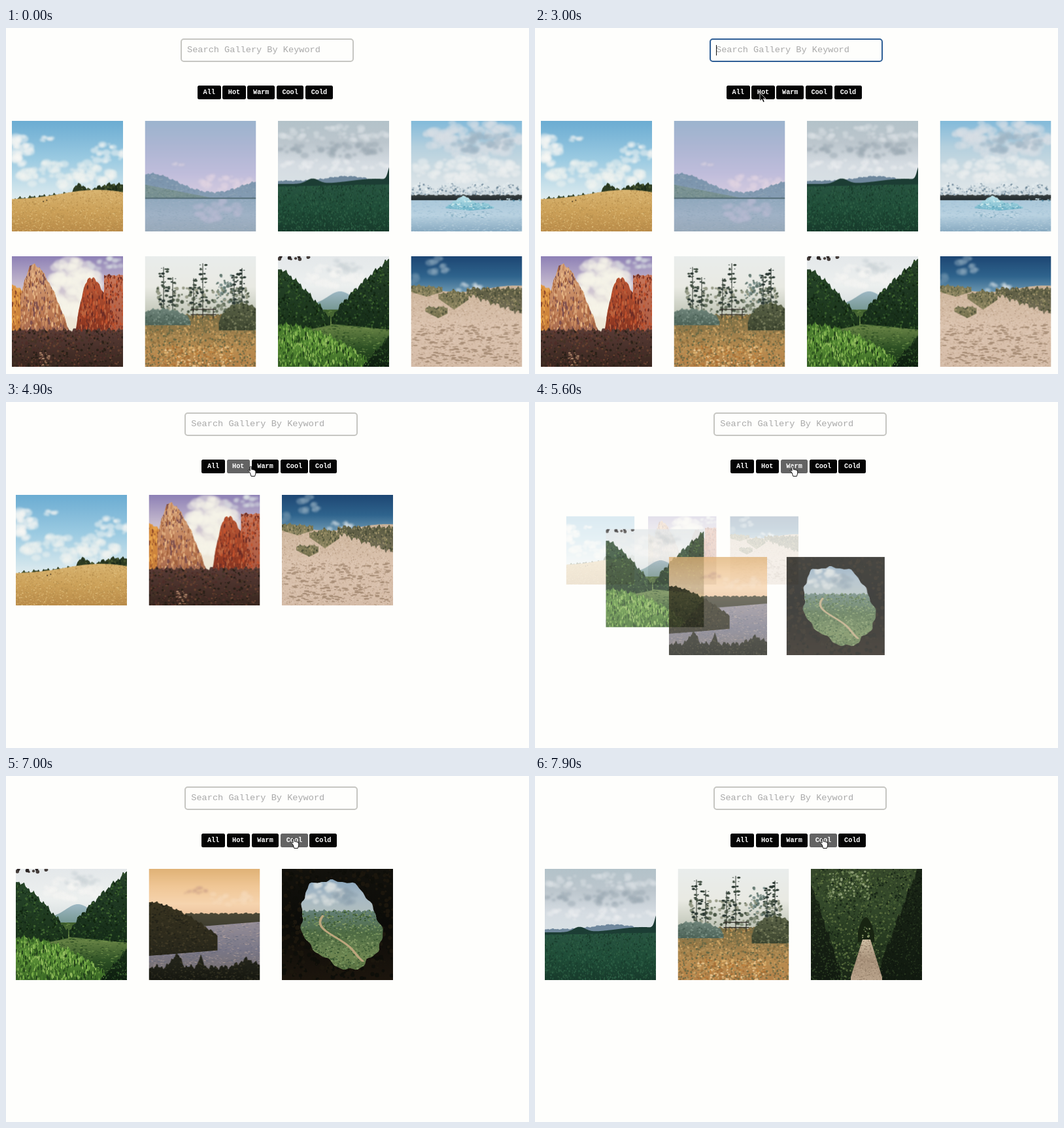
Recreate the animation shown at these times as an HTML page with a canvas. Size 800 px wide and 529 px high, loop 8 s.

```html
<!DOCTYPE html>
<html lang="en">
<head>
<meta charset="utf-8">
<title>Filterable gallery</title>
<style>
html, body { margin: 0; width: 100%; height: 100%; overflow: hidden; background: #fefefc; }
#page { position: absolute; inset: 0; font-family: "Liberation Mono", monospace; }
#search { position: absolute; left: 267px; top: 16px; width: 265px; height: 36px; box-sizing: border-box;
  border: 2px solid #c6c6c2; border-radius: 5px; padding-left: 8px;
  font-size: 13.6px; line-height: 32px; color: #a9a9a9; white-space: pre; }
#search.focus { border-color: #2f5f96; }
#caret { position: absolute; left: 8px; top: 8px; width: 1px; height: 16px; background: #111; }
#bar { position: absolute; left: 293px; top: 88px; display: flex; gap: 2.7px; }
#bar span { padding: 0 8.6px; height: 20.5px; border-radius: 2.5px; background: #040404; color: #fff;
  font-weight: bold; font-size: 10.2px; line-height: 21px; }
#bar span.hover { background: #636363; }
#grid canvas { position: absolute; left: 9.2px; top: 141.5px; width: 169.7px; height: 169.7px; }
#cursor { position: absolute; left: 0; top: 0; overflow: visible; }
</style>
</head>
<body>
<div id="page">
  <div id="search">Search Gallery By Keyword<i id="caret"></i></div>
  <div id="bar"><span>All</span><span>Hot</span><span>Warm</span><span>Cool</span><span>Cold</span></div>
  <div id="grid"></div>
</div>
<svg id="cursor" width="20" height="20">
  <path id="arrow" d="M0 0V12.5L3 9.9 5.1 14.6 7.2 13.7 5.2 9.2H9Z" fill="#000" stroke="#fff" stroke-width=".8"/>
  <path id="beam" d="M-2-7Q0-7 0-5V5Q0 7-2 7M2-7Q0-7 0-5V5Q0 7 2 7" fill="none" stroke="#222"/>
  <path id="hand" d="M3 9L.6 6.6Q-.4 5 1.3 5L3 6.4V1Q3-.6 4.2-.6T5.4 1V4.2Q7.2 3.5 7.8 4.8 9.4 4.2 9.9 5.5 11.7 5.2 11.7 7V10L10.4 14.5H4.8Z" fill="#fff" stroke="#000" stroke-width=".9"/>
</svg>
<script>
const $ = id => document.getElementById(id);
const { abs, sin, cos, exp, min, max, PI } = Math;
const SIZE = 170, LOOP = 8000;
let seed = 7, g;
const rnd = () => (seed = (seed * 16807) % 2147483647) / 2147483647;
const hill = (x, center, width, height) => height * exp(-(((x - center) / width) ** 2));
const rough = (x, size) => size * (sin(x * .37) + sin(x * .83 + 1) + sin(x * 1.7 + 2) / 2);

function dot(x, y, rx, ry) {
  g.beginPath();
  g.ellipse(x, y, rx, ry, 0, 0, 7);
  g.fill();
}
// Random specks in a box; tall > 1 gives blades, tall < 1 gives ripples.
function spray(colors, x, y, w, h, r = 1, tall = 1) {
  const list = colors.split(" ");
  for (let n = w * h / (r * r * 7 * tall ** .5); n > 0; n--) {
    const k = r * (.4 + rnd());
    g.fillStyle = list[Math.floor(rnd() * list.length)];
    dot(x + rnd() * w, y + rnd() * h, k, k * tall);
  }
}
function cloud(color, x, y, w, h) {
  g.save();
  g.filter = "blur(1.5px)";
  g.globalAlpha = .5;
  g.fillStyle = color;
  for (let n = 8 + w * h / 90; n > 0; n--) {
    const a = rnd() * 7, d = rnd() ** .5 / 2, k = (2 + h / 9) * (.4 + rnd());
    dot(x + w / 2 + cos(a) * d * w, y + h / 2 + sin(a) * d * h, k, k * .7);
  }
  g.restore();
}
// Ground below a skyline top(x), with a vertical blend and optional specks.
function land(colors, top, { bottom = () => SIZE, from = 0, to = SIZE, specks, r, tall } = {}) {
  const xs = Array.from({ length: to - from + 1 }, (_, i) => from + i);
  const y0 = min(...xs.map(top)), y1 = max(...xs.map(bottom));
  const blend = g.createLinearGradient(0, y0, 0, y1), list = colors.split(" ");
  list.forEach((c, i) => blend.addColorStop(i / max(1, list.length - 1), c));
  g.save();
  g.beginPath();
  xs.forEach(x => g.lineTo(x, top(x)));
  xs.reverse().forEach(x => g.lineTo(x, bottom(x)));
  g.fillStyle = blend;
  g.fill();
  if (specks) {
    g.clip();
    spray(specks, from, y0, to - from, y1 - y0, r, tall);
  }
  g.restore();
}
const sky = (colors, y = 120) => land(colors, () => 0, { bottom: () => y });

const scenes = [
  function wheat() {
    sky("#6bacd2 #9ccbe2 #dfecef");
    cloud("#fbfaf5", 0, 20, 30, 48);
    cloud("#fbfaf5", 40, 22, 22, 10);
    cloud("#fbfaf5", 118, 35, 56, 28);
    cloud("#f4f5f2", 8, 62, 150, 42);
    land("#28371f #47512f", x => 120 - x * .1 - hill(x, 103, 9, 13) - hill(x, 150, 28, 8) + rough(x, 1.3),
      { specks: "#1c2b1b #46552f", r: 1.5 });
    land("#d9b571 #cca159 #b98b49", x => 121 - hill(x, 130, 75, 15),
      { specks: "#b18a4a #dfbe7c #c39a56 #d0a762", tall: .5 });
    spray("#4a3a24", 48, 122, 10, 4, 1.6, .7);
  },
  function lake() {
    sky("#9cb4ce #adb6d3 #bfbddb #d9cee1");
    cloud("#e6d8e3", 85, 82, 85, 26);
    cloud("#e4dae4", 42, 65, 18, 4);
    land("#7993ac #94a9bc", x => 113 - hill(x, 8, 58, 32) - hill(x, 178, 45, 20) + rough(x, .8),
      { specks: "#8299ad #8ea3b6 #7a91a9", r: 1.5, tall: .6 });
    land("#7d9597 #657f80", x => 98 + x * .2, { to: 100, specks: "#869c98 #6b8583", r: 1.2, tall: .5 });
    land("#8fa8bd #a0b2c6 #98a9b9", () => 119, { specks: "#a6b5c9 #8ca3b7 #9aacc0", r: 1.4, tall: .2 });
    cloud("#b9bcd3", 75, 122, 75, 34);
    land("#566e78", () => 118, { bottom: () => 120 });
  },
  function meadow() {
    sky("#b3c2c9 #bcc6cd #d5dce2 #d9e1e5", 100);
    cloud("#9aa8b2", 0, 32, 170, 24);
    cloud("#dce2e5", 0, 8, 170, 24);
    cloud("#edf0f1", 0, 60, 170, 18);
    land("#6e879d #74898f", x => 92 - hill(x, 105, 40, 7) + rough(x, .5));
    land("#1b3933 #1f4a38", x => 97 - hill(x, 53, 13, 8) - hill(x, 150, 55, 8) - hill(x, 172, 5, 22));
    land("#285341 #1f4d38 #173a2b", x => 101 - x * .02,
      { specks: "#275840 #193d2d #204b35 #2d5d43", r: .9, tall: 1.5 });
  },
  function glacier() {
    sky("#82bada #b5d0de #d1dee4 #e5eaec");
    cloud("#d9e0e5", 20, 0, 150, 55);
    cloud("#9eb4c3", 60, 15, 100, 35);
    cloud("#eff2f2", 0, 55, 170, 40);
    land("#e4ecef #8096a4", x => 106 - 10 * abs(sin(x / 14 + .5)) + rough(x, 1),
      { specks: "#e8eff1 #70899a #a9bac5", r: 1.2 });
    land("#a9c7da #bad3e2 #87a9c0", () => 120, { specks: "#b7cfdc #9dbdd1", r: 1.5, tall: .25 });
    land("#3b4141 #222b2f", x => 114 + rough(x, .5), { bottom: () => 122 });
    land("#c4e8ee #6cb1c7", x => 134 - hill(x, 80, 19, 18) - hill(x, 113, 12, 7) + rough(x, .6),
      { from: 53, to: 127, bottom: x => 138 - abs(x - 90) * .1, specks: "#def2f3 #589db5 #9bd0dd", r: 1.2, tall: .7 });
    spray("#d2e6ed #498099", 128, 119, 42, 4, 1.3, .6);
    spray("#5e91a9 #d2e3eb", 55, 140, 65, 9, 1.5, .25);
  },
  function canyon() {
    sky("#8d80b5 #c3b8cd #efe8dc #efe8d2", 125);
    cloud("#f8f5ea", 55, 5, 75, 85);
    cloud("#dbe2e3", 115, 0, 55, 22);
    const red = "#c3532e #6d2d25 #963c24 #bc6540";
    land("#e29a45 #a85c2c", x => 42 + x * .7 + rough(x, 1),
      { to: 26, specks: "#eaa84f #8c4727 #cf853d", tall: 3 });
    land("#d9a87f #bb7953 #744b4e", x => 12 + (x < 34 ? (34 - x) ** 2 * .12 : ((x - 34) / 54) ** 1.5 * 104) + rough(x, 1.2),
      { from: 13, to: 90, specks: "#e7b887 #a4633e #c98c61 #7d4f4d", tall: 3 });
    land("#c8785c #97452f", x => 29 + rough(x, .8), { from: 141, specks: red, tall: 2 });
    land("#bb5938 #913a23 #702d22", x => 32 + (x < 125 ? ((125 - x) / 27) ** 2.5 * 80 : (x - 125) * 1.5) + rough(x, 1.2),
      { from: 97, to: 150, specks: red, tall: 3 });
    land("#5a3c37 #38261f", x => 113 + rough(x, 1.5),
      { specks: "#2a2018 #65402f #443326 #4e2d28", r: 1.4 });
    spray("#b48b70 #8c674f", 42, 148, 15, 22, 1.5, .6);
  },
  function garden() {
    sky("#e9edec #e9eae3 #bcc1b2", 95);
    spray("#687360 #87907c #4b5847 #999d89", 15, 48, 145, 38, 2.2);
    spray("#7f9490 #63776f", 108, 26, 28, 45, 2);
    for (const x of [28, 42, 74, 88, 136, 148]) {
      const y = 10 + 24 * abs(sin(x));
      land("#333b33", () => y, { from: x, to: x + 1, bottom: () => 85 });
      for (let yy = y; yy < 75; yy += 7) spray("#2c3934 #435044", x - 6, yy, 13, 4, 2, .7);
    }
    land("#746a42 #997d4b #b98c50 #b58148", x => 90 + rough(x, 1),
      { specks: "#b6935c #716943 #cda465 #8d6f3f #656744", r: 1.1, tall: 1.3 });
    const bush = (x, width, height) => hill(x, 18, 48, 0) + height * max(0, 1 - (abs(x) / width) ** 2) ** .5;
    land("#71867c #4c6257", x => 104 - bush(x - 25, 46, 23) + rough(x, 1),
      { to: 70, bottom: () => 106, specks: "#7d9286 #4b6156 #647c6f", r: 1.2 });
    land("#5c6449 #3d452f", x => 112 - bush(x - 148, 36, 40) + rough(x, 1),
      { from: 113, bottom: () => 114, specks: "#6b714f #353d2b #515a3d #7b8060", r: 1.2 });
    spray("#dcb06d #c0823e #e5c08a #a87138", 28, 138, 106, 31, 1.4);
    for (const y of [81, 89]) land("#2e2a25", () => y, { from: 70, to: 109, bottom: () => y + 1.3 });
    for (const x of [73, 88, 104]) land("#2e2a25", () => 80, { from: x, to: x + 1, bottom: () => 96 });
  },
  function river() {
    sky("#e4e8ea #edf0ef #cfd8d9", 90);
    cloud("#f5f6f4", 45, 12, 85, 35);
    cloud("#cbd3d7", 70, 6, 60, 20);
    spray("#2b2524 #463f3c", 0, 0, 62, 6, 2.5);
    const leaves = "#152b19 #294a24 #3d622f #10240f #1f3a1c";
    land("#9eb8c4 #6c8f86", x => 74 - hill(x, 95, 26, 20), { from: 60, to: 118, bottom: () => 90 });
    land("#3e5e2d #648043 #2d5024 #142c14", () => 82, { specks: "#78994f #315426 #507037 #213f1c", r: 1.8, tall: .25 });
    land("#27462a #182f18", x => 18 + (x / 78) ** 1.3 * 75 + rough(x, 1.8),
      { to: 80, bottom: x => 122 - x * .2, specks: leaves, r: 1.3 });
    land("#27422a #152c18", x => 96 - 92 * (max(0, x - 82) / 88) ** .8 + rough(x, 1.8),
      { from: 82, bottom: x => 104 + (x - 82) * .1, specks: leaves, r: 1.3 });
    land("#3f6f2a #5d9138 #376424", x => 104 + (x / 150) ** 2 * 66 + rough(x, 2),
      { to: 150, specks: "#78ad47 #2f5720 #93bc5d #477a2b #203f1a", r: .9, tall: 3 });
    land("#1b321a #0d1d0f", x => 170 - (x - 130) * 1.2 + rough(x, 1.5), { from: 130, specks: leaves });
  },
  function dunes() {
    sky("#1d4673 #2f648d #7da5bb", 62);
    cloud("#8ea9bd", 26, 0, 32, 28);
    cloud("#668ba8", 0, 22, 10, 22);
    cloud("#f1f4f3", 68, 39, 38, 16);
    land("#cbb399 #dcc4b0 #d5bca8", x => 50 + 5 * sin(x / 28 - 1),
      { specks: "#e0cbb9 #cbb19a #d7bfa9 #b69b83", r: 1, tall: .6 });
    const grass = "#6b6b48 #8a845f #484b36 #a4976f", tuft = { specks: grass, r: 1, tall: 1.4 };
    land("#7a7753 #8f8764", x => 44 + x * .08 + rough(x, 1), { to: 48, bottom: x => 62 - abs(x - 24) * .3, ...tuft });
    land("#73704d #8d8562", x => 52 + abs(x - 66) * .3 + rough(x, 1), { from: 42, to: 88, bottom: x => 82 - abs(x - 66) * .7, ...tuft });
    land("#85805e #79734e", x => 78 + rough(x, 1), { from: 22, to: 56, bottom: x => 95 - abs(x - 42) * .5, ...tuft });
    land("#595a40 #77705a", x => 49 + rough(x, 1.5), { from: 85, bottom: x => 58 + (x - 85) * .36 + rough(x, 2), ...tuft });
    spray("#a88e77", 5, 105, 160, 60, 3, .3);
  },
  function lane() {
    land("#35472a #33482a #25381f #182415", () => 0, { specks: "#1a2818 #435a32 #2b3e23 #566a3c", r: 1.3 });
    spray("#8b9b72 #6a7f52 #435a32", 25, 4, 65, 42, 1.5);
    land("#1b2717 #111a10", x => 150 - (x - 105) * 2.6 + rough(x, 3), { from: 105, specks: "#131c11 #25341d #0f170e" });
    land("#1b2717 #111a10", x => 20 + x * 3 + rough(x, 3), { to: 45, specks: "#131c11 #2b3d22" });
    land("#182412", x => 74 + (x - 84) ** 2 * .15, { from: 72, to: 97, bottom: () => 112 });
    spray("#78885a #a8ab80 #445b34", 79, 88, 11, 17, 1.3);
    land("#d0c1a6 #a58f78 #b8a28a", x => 108 + max(0, abs(x - 85) - 6) * 3.2,
      { from: 61, to: 109, specks: "#bda78f #96816b", r: 1.1, tall: .6 });
  },
  function sunset() {
    sky("#e0b276 #f0c796 #f6d4ae #e8bd98", 80);
    cloud("#cc9f88", 42, 28, 48, 10);
    cloud("#f8dcbb", 85, 35, 80, 20);
    land("#989099 #797787 #766c67", () => 78, { specks: "#b6a59f #5f6578 #91868a #807d8c", r: 1.5, tall: .25 });
    land("#4d4936 #3d3c30", x => 68 + rough(x, .7), { from: 55, bottom: x => 90 - (x - 55) * .08 });
    land("#393420 #27261b", x => 50 + (x / 105) ** 1.6 * 52 + rough(x, 1),
      { to: 105, bottom: x => 133 - x * .08, specks: "#403a26 #232218 #302c1d", r: 1.2 });
    land("#292a20 #15160f", x => 150 - hill(x, 42, 9, 20) - hill(x, 79, 5, 15) - hill(x, 150, 16, 12) + rough(x, 2),
      { specks: "#1c1d15 #353323 #22231a" });
  },
  function cave() {
    land("#12110c #0b0b08 #1c150d", () => 0, { specks: "#0e0e09 #1b160d", r: 2.5 });
    g.save();
    g.beginPath();
    for (let a = 0; a < 2 * PI; a += .06) {
      const k = 1 + .04 * sin(5 * a) + .03 * sin(11 * a) + .015 * sin(23 * a);
      g.lineTo(90 + k * (60 * cos(a) + 14 * sin(a)), 84 + k * 68 * sin(a));
    }
    g.clip();
    sky("#7698b4 #a4b7c4 #b4c0bd", 75);
    cloud("#e2e5e3", 34, 20, 65, 35);
    cloud("#8c9fad", 80, 30, 45, 25);
    land("#64807a #4e6b44 #6d8550 #445d33", x => 64 + rough(x, 1),
      { specks: "#72905a #3a5833 #839a65 #4b673e", r: 1.3, tall: .7 });
    for (let y = 72; y < 142; y++) {
      g.fillStyle = "#bda67d";
      dot(64 + (y - 70) ** 2 * .013 - 8 * sin(y / 10 - 7), y, 2, 1.2);
    }
    g.restore();
  },
  function prairie() {
    sky("#cdd1c4 #dcdcc6 #d4d2ba");
    cloud("#e8e6d5", 0, 25, 170, 55);
    land("#a5a88d #999b7b", x => 106 - x * .06 + rough(x, .6));
    land("#94946f #70744f", () => 109, { specks: "#b1ae87 #5f6843 #86845c", tall: 2.5 });
  }
];

const tiles = scenes.map((draw, i) => {
  const el = document.createElement("canvas");
  el.width = el.height = SIZE;
  g = el.getContext("2d");
  draw();
  $("grid").append(el);
  return { el, x: i % 4 * 203.5, y: Math.floor(i / 4) * 207 };
});

const filters = [
  { at: 3600, show: [0, 4, 7] },
  { at: 5310, show: [6, 9, 10] },
  { at: 7020, show: [2, 5, 8] }
];
// Cursor moves: each arrives at its place at time t after travelling for ms.
const moves = [
  { t: 1700, ms: 800, x: 647, y: 59 },
  { t: 2450, ms: 750, x: 420, y: 36 },
  { t: 3000, ms: 320, x: 344, y: 99 },
  { t: 5150, ms: 550, x: 390, y: 99 },
  { t: 6850, ms: 550, x: 436, y: 96 }
];

const clamp = v => max(0, min(1, v));
const mix = (a, b, p) => a + (b - a) * p;
// cubic-bezier(0, 0, .58, 1)
function easeOut(x) {
  let lo = 0, hi = 1;
  for (let i = 0; i < 20; i++) {
    const s = (lo + hi) / 2;
    if (1.74 * s * s * (1 - s) + s ** 3 < x) lo = s; else hi = s;
  }
  return 3 * lo * lo * (1 - lo) + lo ** 3;
}

function drawTiles(t) {
  tiles.forEach((tile, i) => {
    let { x, y } = tile, on = 1;
    for (const { at, show } of filters) {
      const p = easeOut(clamp((t - at) / 500)), slot = show.indexOf(i);
      if (slot >= 0) {
        x = mix(x, slot * 203.5, p);
        y = mix(y, 0, p);
      }
      on = mix(on, slot >= 0 ? 1 : 0, p);
    }
    tile.el.style.opacity = on;
    tile.el.style.transform = `scale(${.5 + on / 2}) translate(${x}px, ${y}px)`;
  });
}

function cursorAt(time) {
  let x = 800, y = 140;
  for (const m of moves) {
    const p = clamp((time - m.t) / m.ms + 1), e = p * p * (3 - 2 * p);
    x = mix(x, m.x, e);
    y = mix(y, m.y, e);
  }
  return { x, y };
}
const inside = (el, { x, y }) => {
  const b = el.getBoundingClientRect();
  return x > b.left && x < b.right && y > b.top && y < b.bottom;
};

function render(t) {
  const focus = t >= 2650 && t < 3600;
  $("page").style.left = t < 4150 ? "0" : "6.3px"; // the scrollbar goes away
  $("search").className = focus ? "focus" : "";
  $("caret").style.display = focus && (t - 2650) % 1060 < 530 ? "" : "none";
  drawTiles(t);

  const spot = cursorAt(t), late = cursorAt(t - 100); // hover lags a little
  let kind = inside($("search"), spot) ? "beam" : "arrow";
  for (const button of $("bar").children) {
    const over = inside(button, late);
    button.className = over ? "hover" : "";
    if (over) kind = "hand";
  }
  for (const id of ["arrow", "beam", "hand"]) $(id).style.display = id == kind ? "" : "none";
  $("cursor").style.transform = `translate(${spot.x}px, ${spot.y}px)`;
}

const start = performance.now();
(function tick() {
  render((performance.now() - start) % LOOP);
  requestAnimationFrame(tick);
})();
</script>
</body>
</html>
```
